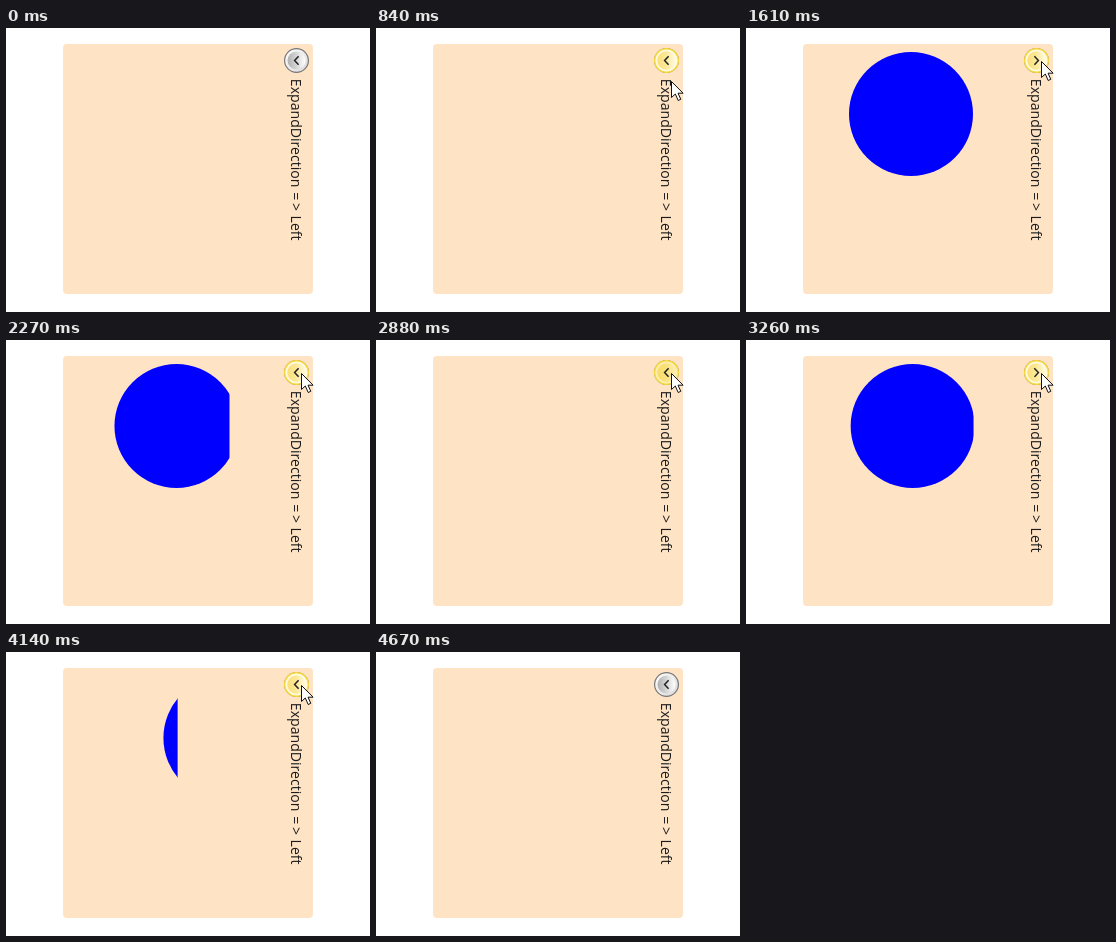
An HTML page for the animation above (5.05 s loop, 364 by 284 pixels).

```html
<!DOCTYPE html>
<html lang="en">
<head>
<meta charset="utf-8">
<title>Expander</title>
<style>
  html, body { margin: 0; width: 100%; height: 100%; overflow: hidden; background: #fff; }
  svg { display: block; width: 364px; height: 284px; }
  text { font: 14.1px "Open Sans", "Noto Sans", sans-serif; fill: #1c1c1c; }
</style>
</head>
<body>
<svg viewBox="0 0 364 284">
  <defs>
    <linearGradient id="steelRim" x2="1" y2="1">
      <stop stop-color="#fff"/><stop offset="1" stop-color="#d8d8d8"/>
    </linearGradient>
    <linearGradient id="steel">
      <stop stop-color="#b0b0b0"/><stop offset=".45" stop-color="#d2d2d2"/><stop offset="1" stop-color="#fff"/>
    </linearGradient>
    <linearGradient id="gold">
      <stop stop-color="#fbe07a"/><stop offset=".45" stop-color="#fce795"/><stop offset="1" stop-color="#fffbe0"/>
    </linearGradient>
    <clipPath id="reveal"><rect id="window" x="90" y="16" width="0" height="140"/></clipPath>
  </defs>

  <rect x="57" y="16" width="250" height="250" rx="4" fill="#ffe3c5"/>
  <g clip-path="url(#reveal)"><circle id="disc" cy="86" r="62" fill="#00f"/></g>

  <g transform="translate(290.5 32.5)">
    <circle r="11.9" fill="url(#steelRim)" stroke="#777" stroke-width="1.2"/>
    <circle r="9" fill="url(#steel)"/>
    <g id="glow">
      <circle r="11.8" fill="#fffae0" stroke="#f8da3c" stroke-width="1.5"/>
      <circle r="9.3" fill="url(#gold)"/>
    </g>
    <circle id="press" r="11" fill="#f3cf30"/>
    <path id="arrow" d="M2.1-4.3-1.9 0 2.1 4.3" fill="none" stroke="#222" stroke-width="1.5"/>
  </g>

  <text transform="translate(285 0) rotate(90)"><tspan x="50.8">ExpandDirection</tspan><tspan x="164.3">=</tspan><tspan x="175">&gt;</tspan><tspan x="187.6">Left</tspan></text>

  <path id="cursor" d="M.5.5v16l3.8-3.5 2.9 6.5 2.6-1.2-2.8-6.1h5.1z" fill="#fff" stroke="#111"/>
</svg>
<script>
const LOOP = 5050;
const FLIP = { openDelay: 212, openTime: 300, closeDelay: 110, closeTime: 200 };
const SLIDE = { openDelay: 313, openTime: 200, closeDelay: 304, closeTime: 214 };
const CLICKS = [1090, 1950, 2800, 3730];

const cursorX = [[210, 314], [450, 304], [640, 295], [4270, 295], [4400, 301], [4660, 321]];
const cursorY = [[210, 258], [460, 182], [720, 98], [840, 53], [940, 33], [4240, 33], [4400, 90], [4660, 278]];
const hover = [[470, 0], [640, 1], [4390, 1], [4570, 0]];

const $ = id => document.getElementById(id);
const clamp = v => Math.min(1, Math.max(0, v));

function track(keys, t) {
  const i = keys.findIndex(k => k[0] > t);
  if (i === 0) return keys[0][1];
  if (i < 0) return keys[keys.length - 1][1];
  const [t0, a] = keys[i - 1], [t1, b] = keys[i];
  return a + (b - a) * (t - t0) / (t1 - t0);
}

// Cubic spline with control points (0.2, 0) and (0, 1).
function spline(x) {
  let lo = 0, hi = 1;
  for (let i = 0; i < 20; i++) {
    const u = (lo + hi) / 2;
    if (0.6 * u * (1 - u) ** 2 + u ** 3 < x) lo = u; else hi = u;
  }
  return lo * lo * (3 - 2 * lo);
}

// Amount open (0 to 1); clicks alternate between opening and closing.
function openness(t, timing) {
  return CLICKS.reduce((sum, click, i) => {
    const kind = i % 2 ? 'close' : 'open';
    const x = clamp((t - click - timing[kind + 'Delay']) / timing[kind + 'Time']);
    const part = x === 0 || x === 1 ? x : spline(x);
    return sum + (i % 2 ? -part : part);
  }, 0);
}

function draw(t) {
  const shut = 1 - openness(t, SLIDE);
  $('disc').setAttribute('cx', 165 + 62 * shut);
  $('window').setAttribute('width', 139.3 - 65.7 * shut);
  $('disc').style.visibility = shut > 0.995 ? 'hidden' : 'visible';

  $('arrow').setAttribute('transform', `rotate(${180 * openness(t, FLIP)})`);
  $('glow').setAttribute('opacity', track(hover, t));
  const pressed = CLICKS.reduce((m, c) => Math.max(m, track([[c, 0], [c + 90, 0.3], [c + 250, 0]], t)), 0);
  $('press').setAttribute('opacity', pressed);

  const x = Math.round(track(cursorX, t)), y = Math.round(track(cursorY, t));
  $('cursor').setAttribute('transform', `translate(${x} ${y})`);
  $('cursor').style.visibility = t >= 210 && t < 4670 ? 'visible' : 'hidden';
}

const start = performance.now();
function tick() {
  draw((performance.now() - start) % LOOP);
  requestAnimationFrame(tick);
}
tick();
</script>
</body>
</html>
```
